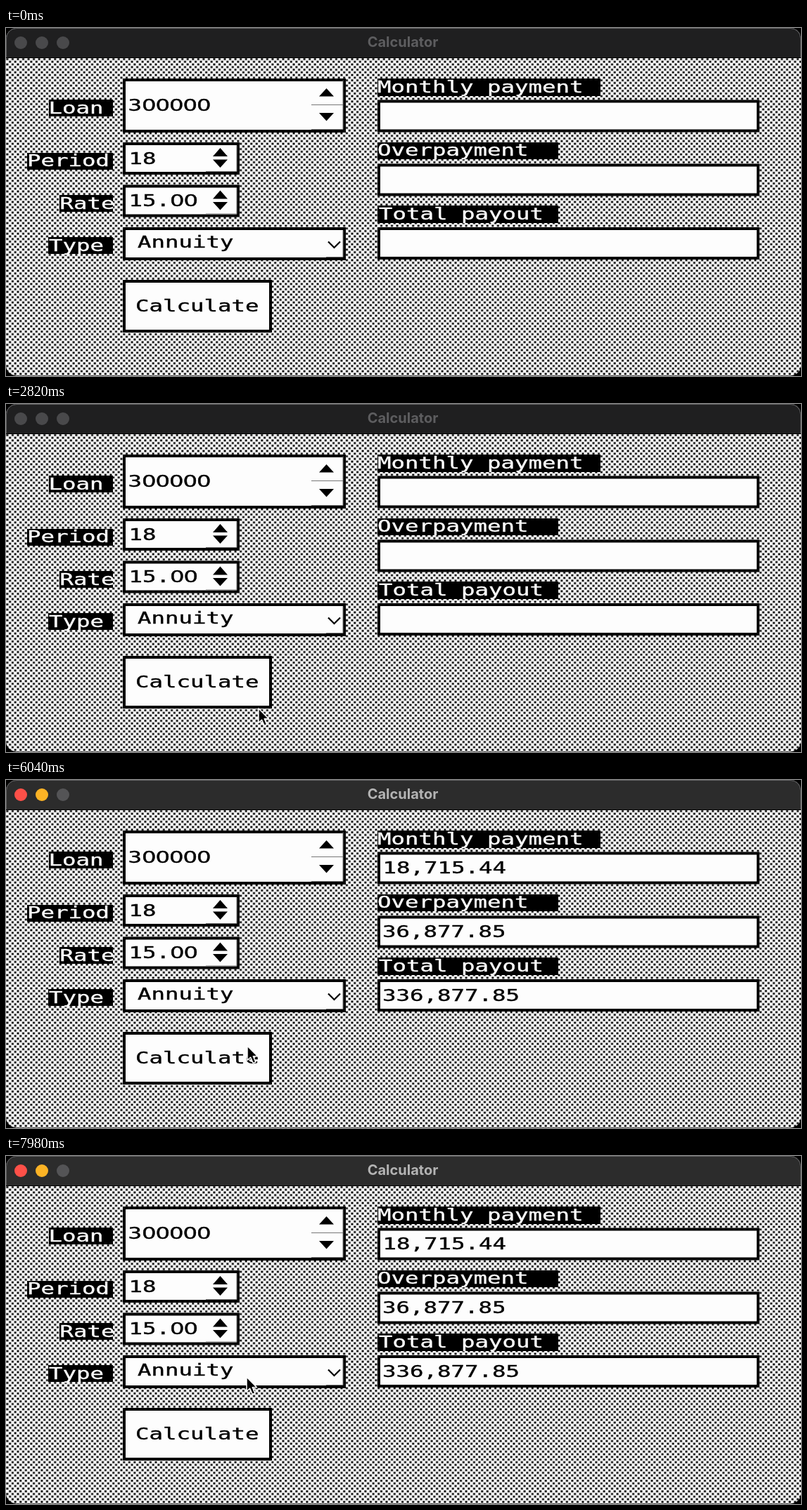
Write an HTML page that moves like this. It is 1130 px wide and 496 px high and loops after 8 s.

```html
<!DOCTYPE html>
<html lang="en">
<head>
<meta charset="utf-8">
<title>Calculator</title>
<style>
html, body { margin: 0; width: 100%; height: 100%; overflow: hidden; background: #000; }
svg { display: block; width: 1130px; height: 496px; }

.pixel { font: 23.3px "DejaVu Sans Mono", monospace; white-space: pre; fill: #000; stroke: #000; stroke-width: .35; }
.light { fill: #fff; stroke: #fff; }
.zero { font-family: "DejaVu Sans", sans-serif; letter-spacing: -.034em; }
.title { font: 700 20px Inter, sans-serif; text-anchor: middle; }
.field { fill: #fdfdfd; stroke: #000; stroke-width: 4; }
.hair { stroke: #777; stroke-width: 1; fill: none; }

.active, .pressed, .results, .cursor { animation: 8s infinite; }
.active { animation-name: activate; animation-timing-function: step-end; }
.pressed { animation-name: press; animation-timing-function: step-end; }
.results { animation-name: reveal; animation-timing-function: step-end; }
.cursor { animation-name: point; animation-timing-function: linear; }

@keyframes activate { 0% { opacity: 0 } 57%, 100% { opacity: 1 } }
@keyframes press { 0% { opacity: 0 } 59.75% { opacity: 1 } 61%, 100% { opacity: 0 } }
@keyframes reveal { 0% { opacity: 0 } 61%, 100% { opacity: 1 } }
@keyframes point {
  0%, 31.25% { transform: translate(376px, 499px) }
  35.25% { transform: translate(359px, 434px); animation-timing-function: ease-out }
  40.5%, 66.5% { transform: translate(338px, 396px) }
  75.5% { transform: translate(343px, 379px) }
  86% { transform: translate(344px, 337px) }
  90.75% { transform: translate(343.5px, 328px) }
  96.5% { transform: translate(342.5px, 317px) }
  99.75%, 100% { transform: translate(342px, 315px) }
}
</style>
</head>
<body>
<svg viewBox="0 0 1130 496">
  <defs>
    <pattern id="dots" x="0" y="42.5" width="7.54" height="7.54" patternUnits="userSpaceOnUse">
      <rect width="7.6" height="7.6" fill="#fff"/>
      <path d="M.4 .4h3v3h-3zM4.17 4.17h3v3h-3z"/>
    </pattern>
    <clipPath id="window"><rect width="1130" height="495.5" rx="15"/></clipPath>
    <g id="spin">
      <path d="M-10.5 0L0-12 10.5 0zM-10.5 4.5h21L0 16z"/>
    </g>
  </defs>

  <g clip-path="url(#window)">
    <rect width="1130" height="496" fill="url(#dots)"/>
    <rect width="1130" height="43" fill="#1f1f20"/>
    <g fill="#49494b">
      <circle cx="21" cy="21" r="9"/><circle cx="51" cy="21" r="9"/><circle cx="81" cy="21" r="9"/>
    </g>
    <text class="title" x="564" y="27" fill="#5d5d5f">Calculator</text>
    <g class="active">
      <rect width="1130" height="43" fill="#2c2c2c"/>
      <circle cx="21" cy="21" r="9" fill="#fe5048"/>
      <circle cx="51" cy="21" r="9" fill="#fcb325"/>
      <circle cx="81" cy="21" r="9" fill="#545456"/>
      <text class="title" x="564" y="27" fill="#b3b3b3">Calculator</text>
    </g>
    <path d="M0 42.5H1130" stroke="#000"/>
    <path d="M.5 42V15A14.5 14.5 0 0 1 15 .5H1115A14.5 14.5 0 0 1 1129.5 15V42" fill="none" stroke="#606062"/>
  </g>

  <path d="M61 102h91v24H61zM30 178h122v24H30zM76 238h76v24H76zM60 298h92v24H60zM528 72h317v25H528zM528 163h257v24H528zM528 253h257v25H528z"/>

  <g class="field">
    <rect x="168" y="74" width="313" height="73"/>
    <rect x="168" y="165" width="162" height="42"/>
    <rect x="168" y="225.5" width="162" height="42"/>
    <rect x="168" y="286" width="313" height="43"/>
    <rect x="168" y="361" width="208" height="71"/>
    <rect x="530" y="104.5" width="539" height="42"/>
    <rect x="530" y="195.5" width="539" height="42"/>
    <rect x="530" y="286" width="539" height="42"/>
  </g>

  <path d="M445 97.5l10.5-11.5 10.5 11.5zM445 121h21l-10.5 11.5z"/>
  <use href="#spin" x="304.5" y="183"/>
  <use href="#spin" x="304.5" y="243.5"/>
  <path class="hair" d="M434 109.5h45M434 144.5h45v-70M284 204.5h44v-37M284 265h44v-37M455 326.5h24v-38"/>
  <path d="M458 304.5l8.5 8.5 8.5-8.5" fill="none" stroke="#000" stroke-width="2.2"/>

  <g class="pixel light">
    <text transform="translate(60.5 122) scale(1.39 1)">Loan</text>
    <text transform="translate(30 197) scale(1.39 1)">Period</text>
    <text transform="translate(76.5 258) scale(1.39 1)">Rate</text>
    <text transform="translate(61 318) scale(1.39 1)">Type</text>
    <text transform="translate(528 92) scale(1.39 1)">Monthly payment</text>
    <text transform="translate(528 182) scale(1.39 1)">Overpayment</text>
    <text transform="translate(530 273) scale(1.39 1)">Total payout</text>
  </g>

  <g class="pixel">
    <text transform="translate(173.5 118) scale(1.39 1)">3<tspan class="zero">00000</tspan></text>
    <text transform="translate(174.5 193.5) scale(1.39 1)">18</text>
    <text transform="translate(174.5 254) scale(1.39 1)">15.<tspan class="zero">00</tspan></text>
    <text transform="translate(187 313) scale(1.39 1)">Annuity</text>
    <text transform="translate(184 404) scale(1.39 1)">Calculate</text>
  </g>

  <g class="pixel results">
    <text transform="translate(535.5 133) scale(1.39 1)">18,715.44</text>
    <text transform="translate(535 224) scale(1.39 1)">36,877.85</text>
    <text transform="translate(535 314.5) scale(1.39 1)">336,877.85</text>
  </g>

  <g class="pressed">
    <rect x="168" y="361" width="208" height="71" stroke="#fff" stroke-width="4"/>
    <text class="pixel light" transform="translate(184 404) scale(1.39 1)">Calculate</text>
  </g>

  <path class="cursor" d="M0 0V20.5L4.6 16.2 8.2 24.6 11.8 23 8.3 14.8H14.5Z" fill="#000" stroke="#fff" stroke-width="1.5" stroke-linejoin="round"/>
</svg>
</body>
</html>
```
